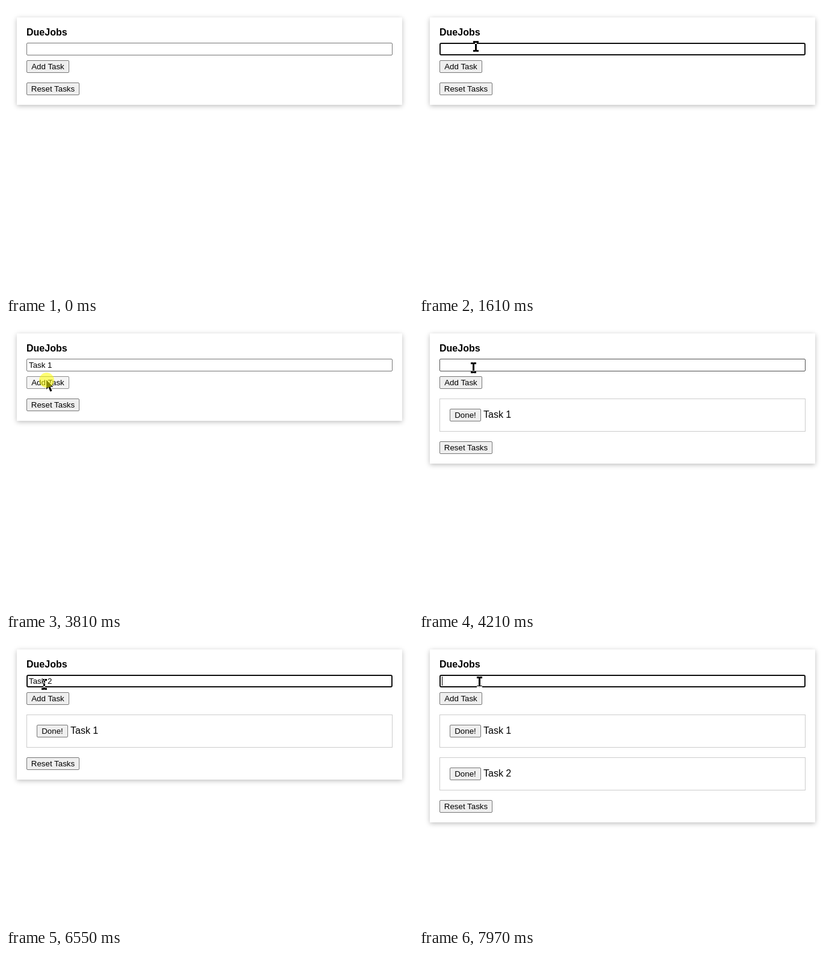
Write an HTML page that moves like this. It is 676 px wide and 478 px high and loops after 8 s.

```html
<!DOCTYPE html>
<html lang="en">
<head>
<meta charset="utf-8">
<title>Task list</title>
<style>
html, body { margin: 0; width: 100%; height: 100%; overflow: hidden; background: #fff; }
body { position: relative; font: 16px/18px "Liberation Sans", Arial, sans-serif; color: #000; }
body * { box-sizing: border-box; }
#card, #card > *, .item *, #pointer, #glow { position: absolute; }
#card { left: 18px; top: 19px; width: 640px; background: #fff; box-shadow: 0 2px 8px rgba(0, 0, 0, .26); }
#title { left: 16px; top: 16px; font-weight: bold; }
#field, .btn { height: 21px; border: 1px solid #767676; border-radius: 2px; font-size: 13.333px; line-height: 15px; white-space: pre; }
#field { left: 16px; top: 42px; width: 608px; padding: 2px 3px; display: flex; }
#field.hover { border-color: #4f4f4f; }
#field.focus { border: 2px solid #101010; padding: 1px 2px; border-radius: 3px; }
#caret { width: 1px; height: 15px; background: #000; }
.btn { padding-top: 2px; background: #efefef; text-align: center; }
.btn.hover { background: #e5e5e5; border-color: #4f4f4f; }
.btn.press { background: #f5f5f5; border-color: #8d8d8d; }
#add { left: 16px; top: 71px; width: 71px; }
#reset { left: 16px; width: 88px; }
.item { left: 16px; width: 608px; height: 55px; border: 1px solid #ccc; }
.item .btn { left: 16px; top: 16px; width: 52px; }
.item span { left: 72px; top: 17px; white-space: pre; }
#pointer { left: 0; top: 0; width: 1px; height: 1px; overflow: visible; }
#pointer path { stroke: #fff; stroke-width: 2; paint-order: stroke; }
#pointer.beam { mix-blend-mode: difference; }
#pointer.beam path { fill: #fff; stroke: none; }
#glow { left: -12px; top: -12px; width: 25px; height: 25px; border-radius: 50%; background: rgba(255, 255, 0, .55); }
</style>
</head>
<body>
<div id="card">
  <div id="title">DueJobs</div>
  <div id="field"><span id="typed"></span><i id="caret"></i></div>
  <div id="add" class="btn">Add Task</div>
  <div class="item" style="top:108px"><div class="btn">Done!</div><span>Task 1</span></div>
  <div class="item" style="top:179px"><div class="btn">Done!</div><span>Task 2</span></div>
  <div id="reset" class="btn">Reset Tasks</div>
</div>
<svg id="pointer"><path id="shape"/></svg>
<div id="glow"></div>
<script>
const LOOP = 8000, KEY = 177, BLINK = 520, PRESS = 105, TICK = 100;
const ARROW = "M0 0v16l3.5-3.5 3 7 3-1.2-3-6.8h5z";
const BEAM = "M-4-9h4l.5 1 .5-1h4v3h-3v12h3v3h-4l-.5-1-.5 1h-4v-3h3v-12h-3z";

// each move ends at x, y and begins where the one before it ended
const enter = { at: 190, x: 23, y: 76 };
const moves = [
  { from: 190, to: 610, x: 94, y: 67 },
  { from: 3310, to: 3710, x: 67, y: 96 },
  { from: 3910, to: 4210, x: 90, y: 76 },
  { from: 6450, to: 6550, x: 63, y: 77 },
  { from: 6550, to: 6860, x: 61, y: 88 },
  { from: 6950, to: 7050, x: 67, y: 93 },
  { from: 7360, to: 7650, x: 100, y: 73 }
];
const rounds = [
  { focus: 1010, type: 1910, add: 3910 },
  { focus: 4320, type: 5130, add: 7360 },
  { focus: 7970, type: Infinity, add: Infinity }
];

const $ = id => document.getElementById(id);
const items = document.querySelectorAll(".item");
const show = (el, on) => { el.style.display = on ? "block" : "none"; };

// the pointer advances in ticks of about 100 ms
function pointerAt(t) {
  let { x, y } = enter;
  for (const m of moves) {
    const n = Math.round((m.to - m.from) / TICK);
    const p = Math.min(1, Math.max(0, Math.floor((t - m.from) / (m.to - m.from) * n + 1e-6) / n));
    x += (m.x - x) * p;
    y += (m.y - y) * p;
  }
  return [Math.round(x), Math.round(y)];
}

function draw(t) {
  const [x, y] = pointerAt(t);
  const visible = t >= enter.at;
  const overField = visible && x >= 34 && x < 642 && y >= 61 && y < 83;
  const overAdd = visible && x >= 34 && x < 105 && y >= 90 && y < 111;

  const count = rounds.filter(r => t >= r.add).length;
  const { focus, type, add } = rounds[count];
  const before = end => t >= end - PRESS && t < end;
  const press = before(add) || count > 0 && before(focus);
  const focused = t >= focus && t < add - PRESS;

  const typed = t < type ? 0 : Math.min(6, 1 + Math.floor((t - type) / KEY));
  const lastInput = typed ? type + (typed - 1) * KEY : focus;
  $("typed").textContent = ("Task " + (count + 1)).slice(0, typed);
  show($("caret"), focused && (t - lastInput) % (2 * BLINK) < BLINK);
  $("field").className = focused ? "focus" : overField ? "hover" : "";
  $("add").className = "btn" + (overAdd ? press ? " press" : " hover" : "");

  items.forEach((item, i) => show(item, i < count));
  $("reset").style.top = 108 + 71 * count + "px";
  $("card").style.height = 145 + 71 * count + "px";

  $("pointer").setAttribute("class", overField ? "beam" : "");
  $("shape").setAttribute("d", overField ? BEAM : ARROW);
  $("pointer").style.transform = $("glow").style.transform = `translate(${x}px, ${y}px)`;
  show($("pointer"), visible);
  show($("glow"), press);
}

let start;
function tick(now) {
  start ??= now;
  draw((now - start) % LOOP);
  requestAnimationFrame(tick);
}
draw(0);
requestAnimationFrame(tick);
</script>
</body>
</html>
```
